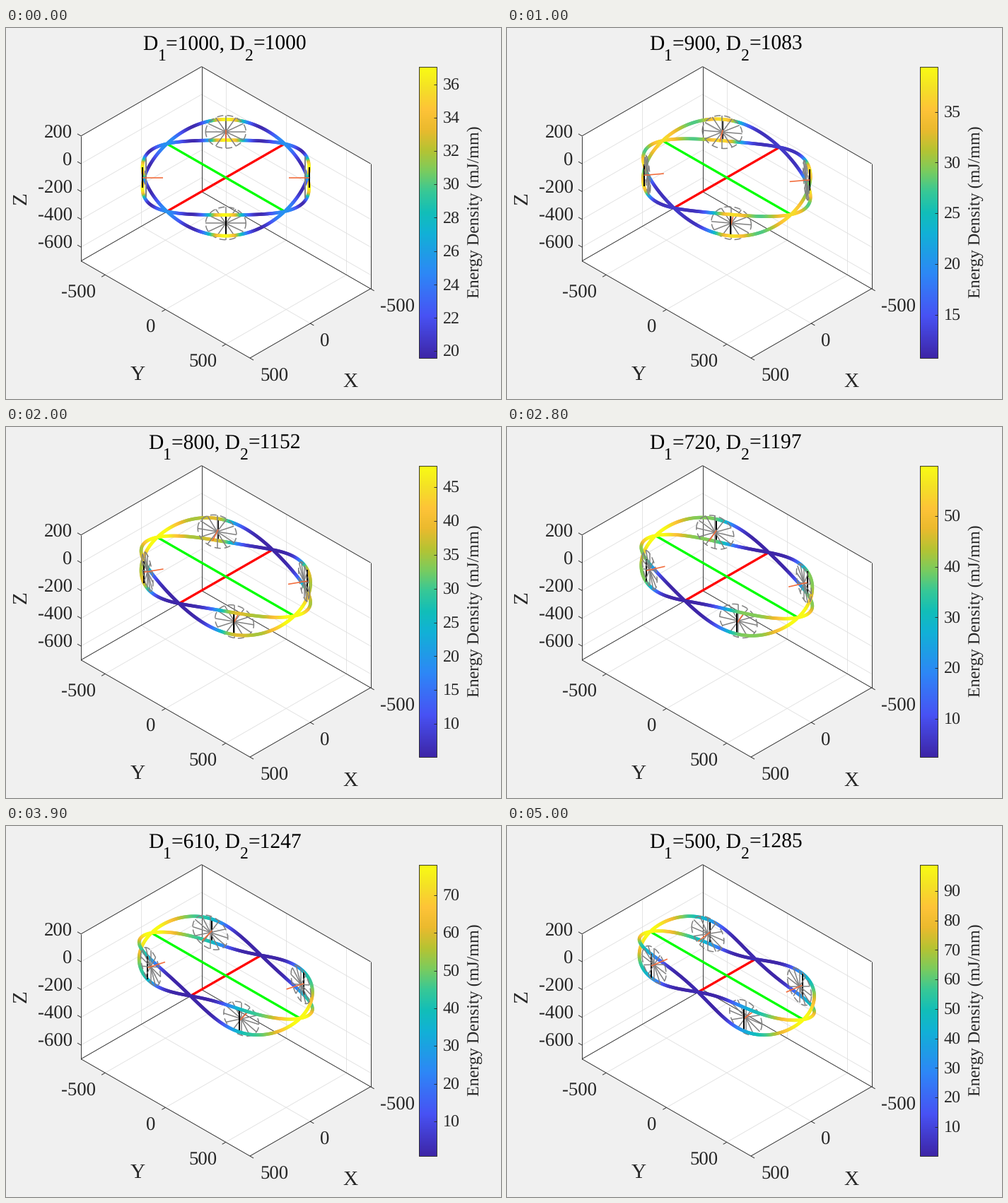
Animation, 700 px wide and 525 px high, one loop 5100 ms. Source, as a matplotlib script:

```python
import numpy as np
import matplotlib.pyplot as plt
from matplotlib.animation import FuncAnimation
from matplotlib.collections import LineCollection
from matplotlib.colors import LinearSegmentedColormap, Normalize

FRAMES, INTERVAL = 51, 100
PX = 0.72                      # points per pixel at 100 dpi
INK = "#262626"
GREY = "#808080"
RADIUS = 488                   # ring radius when circular
WHEEL = 118
HUB_INSET = 21
QUADRANTS = [(-1, -1), (1, -1), (-1, 1), (1, 1)]

plt.rcParams.update({"font.family": "Liberation Serif",
                     "text.hinting": "none",
                     "lines.solid_capstyle": "butt"})
parula = LinearSegmentedColormap.from_list("parula", [
    (0.0, (0.242, 0.150, 0.660)), (0.143, (0.281, 0.323, 0.958)),
    (0.286, (0.179, 0.529, 0.968)), (0.429, (0.069, 0.695, 0.839)),
    (0.5, (0.07, 0.745, 0.725)),
    (0.571, (0.216, 0.784, 0.592)), (0.643, (0.48, 0.80, 0.37)),
    (0.714, (0.71, 0.765, 0.20)), (0.786, (0.92, 0.73, 0.18)),
    (0.857, (0.997, 0.766, 0.22)), (0.93, (0.96, 0.88, 0.15)),
    (1.0, (0.977, 0.984, 0.08))])

fig = plt.figure(figsize=(7, 5.25), dpi=100, facecolor="#f0f0f0")
ax = fig.add_axes([0, 0, 1, 1])
ax.set_xlim(0, 700)
ax.set_ylim(525, 0)
ax.axis("off")


def project(x, y, z=0):
    """Orthographic view along (1, 1, 1), in stage pixels."""
    x, y, z = np.broadcast_arrays(x, y, z)
    return np.stack([310.8 + 0.1706 * (y - x),
                     211.7 + 0.0981 * (x + y) - 0.1966 * z], axis=-1)


def line(pts, color, width, z=1, **kw):
    pts = np.asarray(pts)
    return ax.plot(pts[:, 0], pts[:, 1], color=color, lw=width * PX,
                   zorder=z, **kw)[0]


def line3d(p, q, color, width, z=1):
    return line(project(*np.array([p, q], float).T), color, width, z)


def label(x, y, s, size, ha="center", color=INK):
    """Text whose figures are vertically centred on y."""
    return ax.text(x, y + 0.33 * size, s, fontsize=size * PX, ha=ha,
                   va="baseline", color=color)


def draw_box():
    x0, x1, y0, y1, z0, z1 = -500, 500, -700, 700, -700, 200
    panes = [
        [(x0, y0, z0), (x1, y0, z0), (x1, y1, z0), (x0, y1, z0)],
        [(x0, y0, z0), (x1, y0, z0), (x1, y0, z1), (x0, y0, z1)],
        [(x0, y0, z0), (x0, y1, z0), (x0, y1, z1), (x0, y0, z1)]]
    edges = set()
    for pane in panes:
        pts = project(*np.array(pane, float).T)
        ax.fill(pts[:, 0], pts[:, 1], color="white", lw=0, zorder=0)
        edges.update(tuple(sorted(e)) for e in zip(pane, pane[1:] + pane[:1]))

    grid = dict(color="#dedede", width=0.8, z=0.5)
    line3d((0, y0, z0), (0, y1, z0), **grid)
    line3d((0, y0, z0), (0, y0, z1), **grid)
    for y in (-500, 0, 500):
        line3d((x0, y, z0), (x1, y, z0), **grid)
        line3d((x0, y, z0), (x0, y, z1), **grid)
    for z in (-600, -400, -200, 0):
        line3d((x0, y0, z), (x1, y0, z), **grid)
        line3d((x0, y0, z), (x0, y1, z), **grid)
    for p, q in sorted(edges):
        line3d(p, q, INK, 0.9)

    for i, x in enumerate((500, 0, -500)):
        line3d((x, y1, z0), (x, y1 + 30, z0), INK, 0.9)
        label((379.5, 451, 553.5)[i], 491 - 49 * i, str(x), 26.7)
    for i, y in enumerate((-500, 0, 500)):
        line3d((x1, y, z0), (x1 + 30, y, z0), INK, 0.9)
        label((102.5, 205, 278)[i], 373 + 49 * i, str(y), 26.7)
    for i, z in enumerate(range(200, -601, -200)):
        line3d((x1, y0, z), (x1, y0 - 30, z), INK, 0.9)
        label(93.7, 146.6 + 39.2 * i, str(z), 26.7, "right")

    label(486.5, 498.5, "X", 29.3)
    label(186, 488.5, "Y", 29.3)
    ax.text(22, 241, "Z", fontsize=29.3 * PX, rotation=90, color=INK,
            ha="center", va="center")


BAR_L, BAR_R, BAR_T, BAR_B = 584.3, 609.3, 54.7, 466.7


def draw_bar():
    ax.imshow(np.linspace(1, 0, 256)[:, None], cmap=parula, aspect="auto",
              extent=(BAR_L, BAR_R, BAR_B, BAR_T), zorder=1)
    ax.set_xlim(0, 700)
    ax.set_ylim(525, 0)
    line([(BAR_L, BAR_T), (BAR_R, BAR_T), (BAR_R, BAR_B), (BAR_L, BAR_B),
          (BAR_L, BAR_T)], INK, 0.9, 2)
    ax.text(663, 260, "Energy Density (mJ/mm)", fontsize=24 * PX,
            rotation=90, color=INK, ha="center", va="center")


def bar_ticks(lo, hi):
    span = hi - lo
    step = 2 if span < 20 else 5 if span < 50 else 10
    out = []
    for v in np.arange(np.ceil(lo / step) * step, hi, step):
        y = BAR_B - (v - lo) / span * (BAR_B - BAR_T)
        out.append(line([(BAR_R - 4, y), (BAR_R, y)], INK, 0.9, 3))
        out.append(label(617.5, y, f"{v:.0f}", 24, "left"))
    return out


EM = {"D": 0.722, "=": 0.564, ",": 0.25, " ": 0.25}


def title(d1, d2):
    size, small = 29.5, 23.6
    parts = [("D", 0), ("1", 1), (f"={d1}, D", 0), ("2", 1), (f"={d2}", 0)]
    widths = [sum(EM.get(ch, 0.5) for ch in s) * (small if sub else size)
              for s, sub in parts]
    x, out = 309.5 - sum(widths) / 2, []
    for (s, sub), w in zip(parts, widths):
        out.append(ax.text(x, 45.5 if sub else 31, s, color="black",
                           fontsize=(small if sub else size) * PX,
                           ha="left", va="baseline"))
        x += w
    return out


SIGMA = np.linspace(0, 1, 81)
MID = 40
DS = RADIUS * np.pi / 2 * (SIGMA[1] - SIGMA[0])


def quarter(c):
    """Plan of one quarter ring: slope angle, x and y along its length."""
    psi = np.pi / 2 * SIGMA - c * np.sin(np.pi * SIGMA)

    def integral(f):
        return np.concatenate([[0], np.cumsum((f[1:] + f[:-1]) / 2)]) * DS

    sx = integral(np.sin(psi))
    return psi, sx[-1] - sx, integral(np.cos(psi))


BENDS = np.linspace(0, 0.8, 161)
HALF_WIDTHS = np.array([quarter(c)[1][0] for c in BENDS])


def energy(c):
    bend = (1 - 2 * c * np.cos(np.pi * SIGMA)) ** 2
    return (17.8 * bend + 19.2 * np.sin(np.pi * SIGMA) ** 8
            + 7.4 * np.cos(np.pi * SIGMA) ** 6 * np.minimum(bend, 1))


def energy_limits(k):
    lo = 19.6 * np.exp(-0.053 * k - 0.0007 * k * k)
    tip = 48.2 + 1.574 * (k - 20) + 0.0106 * (k - 20) * (k - 39)
    return lo, max(37.06 + 0.24 * k, tip)


def wheel(sx, sy, bx, by, phi, h):
    """Spoked hub, inward normal and strut at one bulge of the ring."""
    nx, ny = -sx * np.cos(phi), -sy * np.sin(phi)
    tx, ty = -sx * np.sin(phi), sy * np.cos(phi)
    bx, by = sx * bx, sy * by
    cx, cy = bx + HUB_INSET * nx, by + HUB_INSET * ny
    near = sx > 0 and sy > 0
    z_hub = 4 if near else 7
    z_strut = 4.5 if sx == sy else 6

    def rim(t):
        return project(cx + WHEEL * np.cos(t) * tx,
                       cy + WHEEL * np.cos(t) * ty, WHEEL * np.sin(t))

    out = [line(rim(np.linspace(0, 2 * np.pi, 91)), GREY, 1.5, z_hub,
                ls=(0, (6, 3.4)), dash_capstyle="butt")]
    hub = project(cx, cy)
    spokes = [(hub, p) for p in rim(np.arange(12) * np.pi / 6)]
    out.append(ax.add_collection(LineCollection(
        spokes, colors=GREY, linewidths=1.5 * PX, zorder=z_hub)))
    out.append(line3d((bx, by, 0), (bx + WHEEL * nx, by + WHEEL * ny, 0),
                      "#f26b3a", 1.6, z_hub + 0.1))
    out.append(line3d((bx, by, -h), (bx, by, h), "black", 2, z_strut))
    return out


moving = []


def update(k):
    while moving:
        moving.pop().remove()
    u = k / (FRAMES - 1)
    d1 = 1000 - 10 * k
    d2 = round(1000 + u * (457 - 207.5 * u + 35.2 * u * u))
    c = np.interp(-(d1 / 2 - 12), -HALF_WIDTHS, BENDS)
    psi, x, y = quarter(c)
    h = 75 + 10 * u
    lo, hi = energy_limits(k)

    moving.extend(title(d1, d2))
    moving.extend(bar_ticks(lo, hi))
    moving.append(line3d((-x[0], 0, 0), (x[0], 0, 0), "red", 3.3, 3))
    moving.append(line3d((0, -y[-1], 0), (0, y[-1], 0), "lime", 3.3, 3.1))

    colors = parula(Normalize(lo, hi, clip=True)(energy(c)))[1:-1]
    lift = h * np.sin(np.pi * SIGMA)
    for sx, sy in QUADRANTS:
        for side in (-1, 1):
            p = project(sx * x, sy * y, side * lift)
            segs = np.stack([p[:-2], p[1:-1], p[2:]], axis=1)
            moving.append(ax.add_collection(LineCollection(
                segs, colors=colors, linewidths=4.6 * PX, zorder=5)))
        moving.extend(wheel(sx, sy, x[MID], y[MID], psi[MID], h))
    return moving


draw_box()
draw_bar()
anim = FuncAnimation(fig, update, frames=FRAMES, interval=INTERVAL,
                     init_func=lambda: [], repeat=True, repeat_delay=0,
                     blit=False)
plt.show()
```
